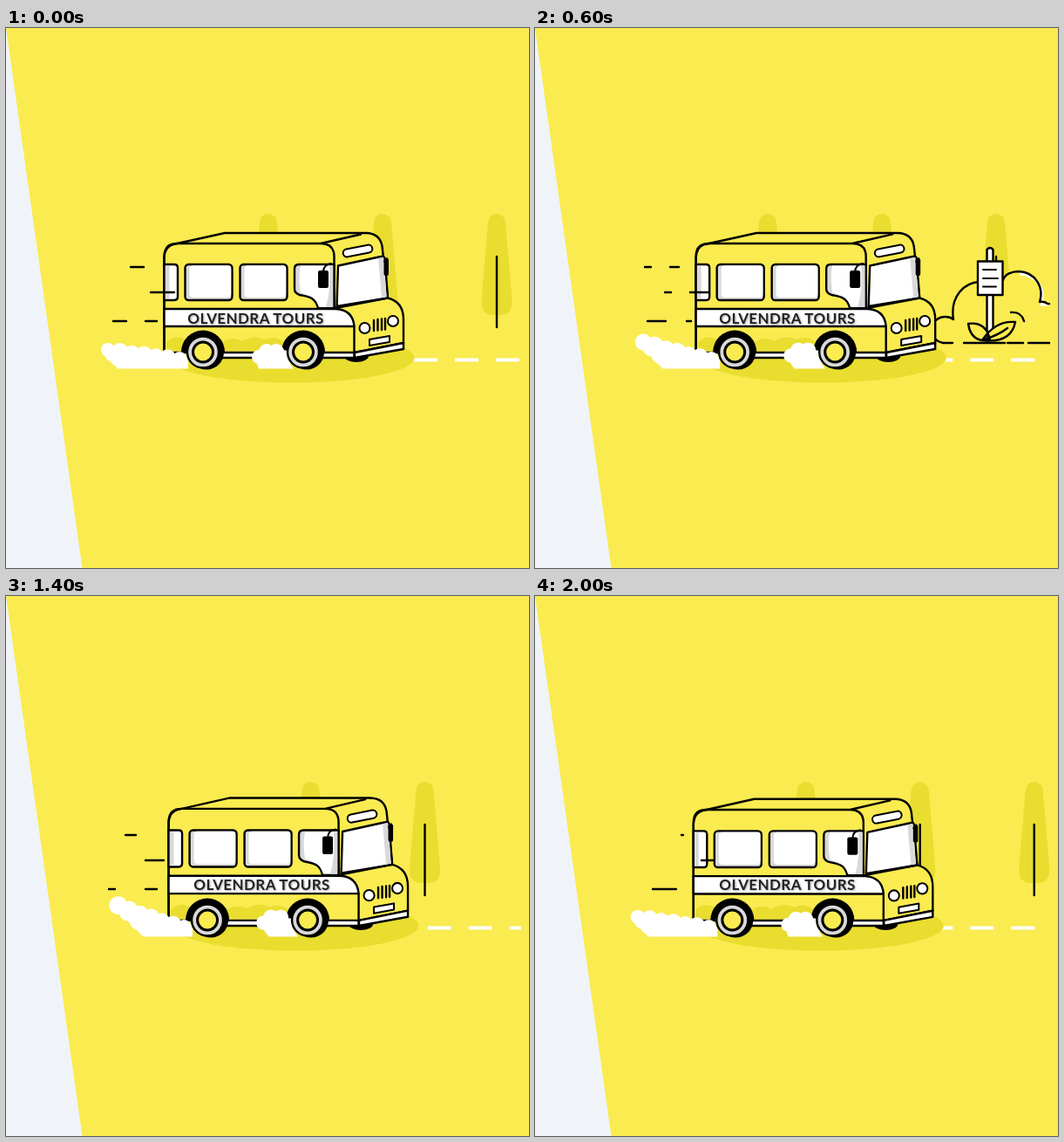
An HTML page that plays this animation: 600x619 px, repeating every 2.1 s.

```html
<!DOCTYPE html>
<html lang="en">
<head>
<meta charset="utf-8">
<title>Tour bus</title>
<style>
html, body { margin: 0; width: 100%; height: 100%; overflow: hidden; background: #f0f4f8; }
svg { display: block; width: 100%; height: 100%; }
.ln { fill: none; stroke: #000; stroke-width: 2.4; stroke-linecap: round; stroke-linejoin: round; }
.y { fill: #faeb50; }
.w { fill: #fff; }
.g { fill: #d9d9d9; }
.k { fill: #000; }
.d { fill: #e9dd2f; }
.thin { stroke-width: 2; }
#label {
  font: 700 17px Lato, Montserrat, sans-serif;
  letter-spacing: .4px;
  fill: #222; text-anchor: middle;
  filter: drop-shadow(1px 1px 1px rgba(0, 0, 0, .35));
}
</style>
</head>
<body>
<svg viewBox="0 0 600 619" preserveAspectRatio="none">
  <defs>
    <clipPath id="view"><path d="M251 0H591V619H251Z"/></clipPath>
    <g id="tree">
      <path class="d" d="M-10 223A10 10 0 0 1 10 223L17.5 312Q18 329 4 329H-4Q-18 329-17.5 312Z"/>
      <path class="ln" d="M0 262V343"/>
    </g>
    <g id="arch">
      <path class="k" d="M-25 0A25 25 0 0 1 25 0Z"/>
      <circle class="k" cx="4" r="20"/>
    </g>
    <g id="rim">
      <circle class="ln" r="18" style="fill:#d9d9d9"/>
      <circle class="ln" r="11.5" style="fill:#faeb50;stroke-width:3"/>
    </g>
  </defs>

  <path class="y" d="M0 0H600V619H87.5Z"/>

  <g clip-path="url(#view)">
    <g id="trees">
      <use href="#tree" x="-262"/><use href="#tree" x="-131"/>
      <use href="#tree"/><use href="#tree" x="131"/>
    </g>
    <path id="road" d="M421 380.500H591" fill="none" stroke="#fff" stroke-width="4" stroke-dasharray="27 20"/>
    <!-- bush, bus stop and leaves, with the post at x = 0 -->
    <g id="stop">
      <path class="y" d="M-56 361A15 15 0 0 1-42 332C-44 300-20 289 0 292C14 288 14 279 32 279C52 280 62 298 57 315C78 312 87 328 87 340Q86 361 68 361Z"/>
      <path d="M34 282C54 283 64 299 59 317H70" fill="none" stroke="#fff" stroke-width="3"/>
      <path class="ln" d="M-43 361H-54C-73 357-70 331-51 331Q-46 331-42 334C-46 308-30 291-10 291M15 289C17 282 25 279 33 279C53 280 62 298 57 314Q62 313 66 316C80 316 87 328 87 340Q86 352 80 358"/>
      <path class="ln" d="M-30 361H17M20 361H38M44 361H92M24 326Q36 325 39 336"/>
      <path class="ln w" style="fill:#fff" d="M-3.500 356V254Q0 250 3.500 254V356Z"/>
      <path class="ln" style="fill:#fff" d="M-14 267.500H14.500V306H-14Z"/>
      <path class="ln thin" d="M-8 277H7M-8 287H9M-8 296.500H7"/>
      <path class="ln" style="fill:#faeb50" d="M-25 339Q-4 336 0 358Q-22 361-25 339ZM29 337Q6 335-9 358Q24 362 29 337ZM-9 358Q10 352 20 344"/>
    </g>
  </g>

  <ellipse id="shadow" class="d" cx="327" cy="378" rx="141.500" ry="28.500"/>

  <g id="body">
    <ellipse class="k" cx="402" cy="376" rx="14" ry="7"/>
    <path class="ln" style="fill:#fff" d="M240 371H400V378H240Z"/>
    <path class="ln" style="fill:#faeb50" d="M181.500 371V263Q182 251 192 248L251 235H413Q429 235.500 431.500 250L438 309.500Q456 314 456 334V361L400 372H181.500Z"/>
    <path class="d" d="M184 370V360Q194 351 205 357L250 359Q260 353 271 359Q284 351 297 357Q311 352 320 361L330 370Z"/>
    <path class="ln" d="M181.500 371V262Q181.500 247 196 247H361Q376.500 247 376.500 262V321M361 247L407 236.500"/>
    <!-- side windows -->
    <path class="ln" style="fill:#fff" d="M181.500 271H193Q197 271 197 275V308Q197 312 193 312H181.500Z"/>
    <path class="g" d="M183 273H187.500V310H183Z"/>
    <g id="panes"></g>
    <path class="ln" style="fill:#d9d9d9" d="M336 271H376.500V321H358C355 308 346 308 337 306Q331 304 331 299V276Q331 271 336 271Z"/>
    <path class="w" d="M338 272.500H375V320H359C355 306 346 307 338 303Q335 285 338 272.500Z"/>
    <path class="g" d="M371 273H375V320H367Q373 300 371 273Z"/>
    <!-- windshield -->
    <path class="ln" style="fill:#fff" d="M381 272.500L430 262Q434 261 434.500 264L438 309.500L379.500 319Z"/>
    <path class="g" d="M427 264L433 262.800L436.500 308.500L431 309.500Z"/>
    <rect class="ln thin" style="fill:#fff" x="386.500" y="251" width="34" height="9" rx="4.500" transform="rotate(-11 403.500 255.500)"/>
    <path class="ln thin" d="M364 280Q364 271 373 270M434 268L437 264"/>
    <rect class="k" x="358" y="278" width="12" height="20" rx="2"/>
    <rect class="k" x="433.500" y="264" width="5.500" height="20" rx="2"/>
    <!-- belt, hood and front -->
    <path class="ln" style="fill:#fff" d="M181.500 322H378Q398 323 399.500 342H181.500Z"/>
    <path class="ln" d="M378 321L438 309.500M399.500 342V378"/>
    <path class="ln" style="fill:#fff" d="M400 372L456 361V368L400 378Z"/>
    <circle class="ln thin" style="fill:#fff" cx="411.500" cy="344" r="6"/>
    <circle class="ln thin" style="fill:#fff" cx="444" cy="336" r="6"/>
    <path class="ln" d="M422 335V347M426.500 334V346.500M431 333.500V346M435 333V345.500"/>
    <path class="ln thin" style="fill:#fff" d="M417 357L440 353V360L417 364Z"/>
  </g>
  <text id="label" y="339">OLVENDRA TOURS</text>
  <g id="arches"><use href="#arch" x="226" y="371.500"/><use href="#arch" x="341" y="371.500"/></g>
  <path id="smoke" class="w"/>
  <g id="rims"><use href="#rim" x="226" y="371.500"/><use href="#rim" x="341" y="371.500"/></g>
  <path id="streaks" class="ln"/>
</svg>
<script>
const TAU = Math.PI * 2, LOOP = 2100, HOLD = 100, TICK = 80, TICKS = 27;
const FLOOR = 378;
const $ = id => document.getElementById(id);
const place = (id, transform) => $(id).setAttribute('transform', transform);
const move = (id, x, y = 0) => place(id, `translate(${x} ${y})`);

$('panes').innerHTML = [205.5, 268.5].map(x => `
  <rect class="ln" style="fill:#d9d9d9" x="${x}" y="271" width="54" height="41" rx="4"/>
  <rect class="w" x="${x + 5}" y="272.3" width="47.7" height="36.7" rx="4"/>`).join('');

// One streak's ends, tick by tick, as it flies back and shrinks
const tail = [181, 167, 154, 142, 136, 130, 125];
const head = [188, 182, 177, 171, 159, 147, 134];
const shortHead = [185, 171, 166, 159, 150, 140, 130];
const births = [1, 5, 9, 13, 18, 24];
const rows = [
  { y: 274, dx: 0, births, mixed: true },
  { y: 303, dx: 23, births },
  { y: 336, dx: -8, births: [3, 7, 11, 16, 22, 26] }
];

function streaks(n) {
  let d = '';
  for (const row of rows) for (const [i, b] of row.births.entries()) {
    const k = (n - b + TICKS) % TICKS;
    if (k >= tail.length) continue;
    const end = row.mixed && i % 2 ? shortHead : head;
    d += `M${tail[k] + row.dx + 1} ${row.y}H${end[k] + row.dx - 1}`;
  }
  return d;
}

const puff = (x, y, r) => `M${x - r} ${y}a${r} ${r} 0 1 1 ${2 * r} 0a${r} ${r} 0 1 1 ${-2 * r} 0Z`;

// The trail's far end swells and rises while its foot stays on the ground
function trail(dx, lift) {
  const x0 = 117 + 14 * lift, y0 = 369 - 17 * lift, r0 = 8 + 3 * lift;
  const x1 = 199 + dx, foot = 128 + 35 * lift;
  let d = puff(x0, y0, r0), top = '';
  for (let i = 0; i <= 6; i++) {
    const u = i / 6;
    const x = x0 + (x1 - x0) * u;
    const y = 369 + 11 * u - 17 * lift * (1 - u) ** 1.2;
    if (i) d += puff(x, y, 9 + i % 2 * .8);
    top += `L${x} ${y}`;
  }
  for (const v of [.3, .65]) d += puff(x0 + (foot + 6 - x0) * v, y0 + (384 - y0) * v, 9);
  return d + `M${x0 - 3} ${y0 + 4}${top}L${x1 + 10} 380V390.500H${foot}Z`;
}

function wheelPuff(dx, lift) {
  const x = 282 + dx, up = 3 * lift;
  return puff(x + 8, 377 - up, 8) + puff(x + 17, 371 - up, 9) + puff(x + 28, 371 - up, 9)
    + puff(x + 36, 379, 10) + puff(x + 13 + 5 * lift, 383, 7)
    + `M${x + 8 + 8 * lift} 390.500L${x + 4} ${380 - up}L${x + 17} ${368 - up}L${x + 36} 374L${x + 48} 390.500Z`;
}

function draw(t) {
  const n = Math.floor(Math.floor(t / HOLD) * HOLD / TICK);
  const lift = (1 - Math.cos(TAU * n / TICKS)) / 2;
  const dx = 6 * lift;
  const bounce = (1 - Math.cos(TAU * 4 * n / TICKS)) / 2;
  const nudge = n < 6 ? 0 : n < 10 ? 3 : n < 18 ? 7 : 3;

  move('trees', 563 - 131 / TICKS * n);
  move('stop', 718 - 28 * n);
  $('road').setAttribute('stroke-dashoffset', n * 47 / 3 % 47);
  move('shadow', dx);
  // The body stretches upward from the floor as it bounces
  place('body', `translate(${dx} ${FLOOR}) scale(1 ${1 + .024 * bounce}) translate(0 ${-FLOOR})`);
  move('label', 286.5 + nudge, -2.4 * bounce);
  move('arches', dx);
  move('rims', dx);
  $('smoke').setAttribute('d', trail(dx, lift) + wheelPuff(dx, lift));
  $('streaks').setAttribute('d', streaks(n));
}

const start = performance.now();
function tick() {
  draw((performance.now() - start) % LOOP);
  requestAnimationFrame(tick);
}
tick();
</script>
</body>
</html>
```
